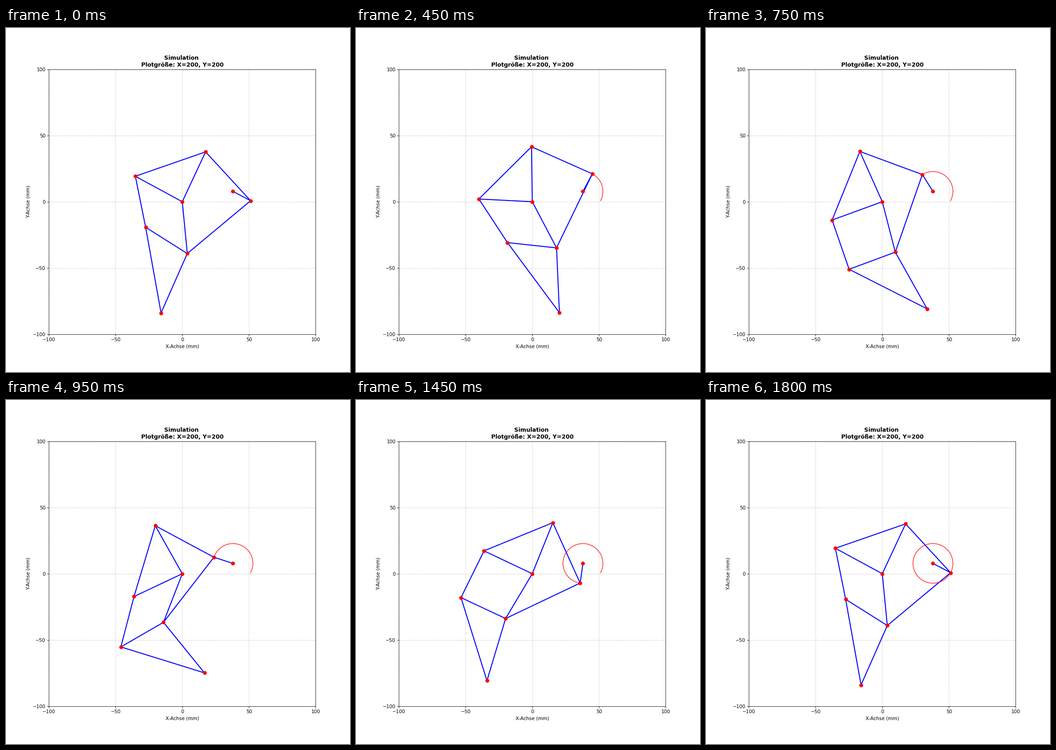
Animation of 748x748 px, one loop 1.85 s. Source, as a matplotlib script:

```python
import numpy as np
import matplotlib.pyplot as plt
from matplotlib.animation import FuncAnimation

FRAMES, INTERVAL = 37, 50
STEP, START = 10, -28          # crank angles in degrees
ORIGIN = np.array([0.0, 0.0])
HUB = np.array([38.0, 7.8])
CRANK = 15

# Rod lengths of the walking linkage
B, C, D, E, F, G = 41.5, 39.3, 40.1, 55.8, 39.3, 37.0
H, I, J, K = 65.7, 49.0, 50.0, 62.0

# Rods as pairs of joints:
# 0 origin, 1 hub, 2 pin, 3 top, 4 left, 5 bottom, 6 knee, 7 foot
RODS = [(1, 2), (2, 3), (2, 5), (0, 3), (0, 4), (3, 4),
        (0, 5), (4, 6), (6, 5), (6, 7), (5, 7)]


def pin_at(n):
    a = np.radians(START + STEP * n)
    return HUB + CRANK * np.array([np.cos(a), np.sin(a)])


def meet(p, rp, q, rq):
    """Intersection of two circles, on the left of the way from p to q."""
    dist = np.hypot(*(q - p))
    u = (q - p) / dist
    along = (rp**2 - rq**2 + dist**2) / (2 * dist)
    side = np.sqrt(max(rp**2 - along**2, 0))
    return p + along * u + side * np.array([-u[1], u[0]])


def joints(n):
    pin = pin_at(n)
    top = meet(ORIGIN, B, pin, J)
    left = meet(ORIGIN, D, top, E)
    bottom = meet(pin, K, ORIGIN, C)
    knee = meet(bottom, G, left, F)
    foot = meet(bottom, I, knee, H)
    return np.array([ORIGIN, HUB, pin, top, left, bottom, knee, foot])


fig, ax = plt.subplots(figsize=(10, 10), dpi=74.8)
fig.subplots_adjust(left=0.1249)
ax.set_xlim(-100, 100)
ax.set_ylim(-100, 100)
ax.set_xticks(range(-100, 101, 50))
ax.set_yticks(range(-100, 101, 50))
ax.set_xlabel("X-Achse (mm)")
ax.set_ylabel("Y-Achse (mm)")
ax.set_title("Simulation \nPlotgröße: X=200, Y=200", fontweight="bold")
ax.grid(True, linestyle="--", alpha=0.7)

rods = [ax.plot([], [], color="blue", lw=2)[0] for _ in RODS]
trail, = ax.plot([], [], color="red", lw=1.5, alpha=0.8)
dots, = ax.plot([], [], "ro", markersize=7, zorder=3)


def update(n):
    pts = joints(n)
    for line, pair in zip(rods, RODS):
        line.set_data(*pts[list(pair)].T)
    trail.set_data(*np.array([pin_at(k) for k in range(n + 1)]).T)
    dots.set_data(*pts.T)
    return [*rods, trail, dots]


anim = FuncAnimation(fig, update, frames=FRAMES, interval=INTERVAL,
                     repeat=True, repeat_delay=0, blit=False)
plt.show()
```
